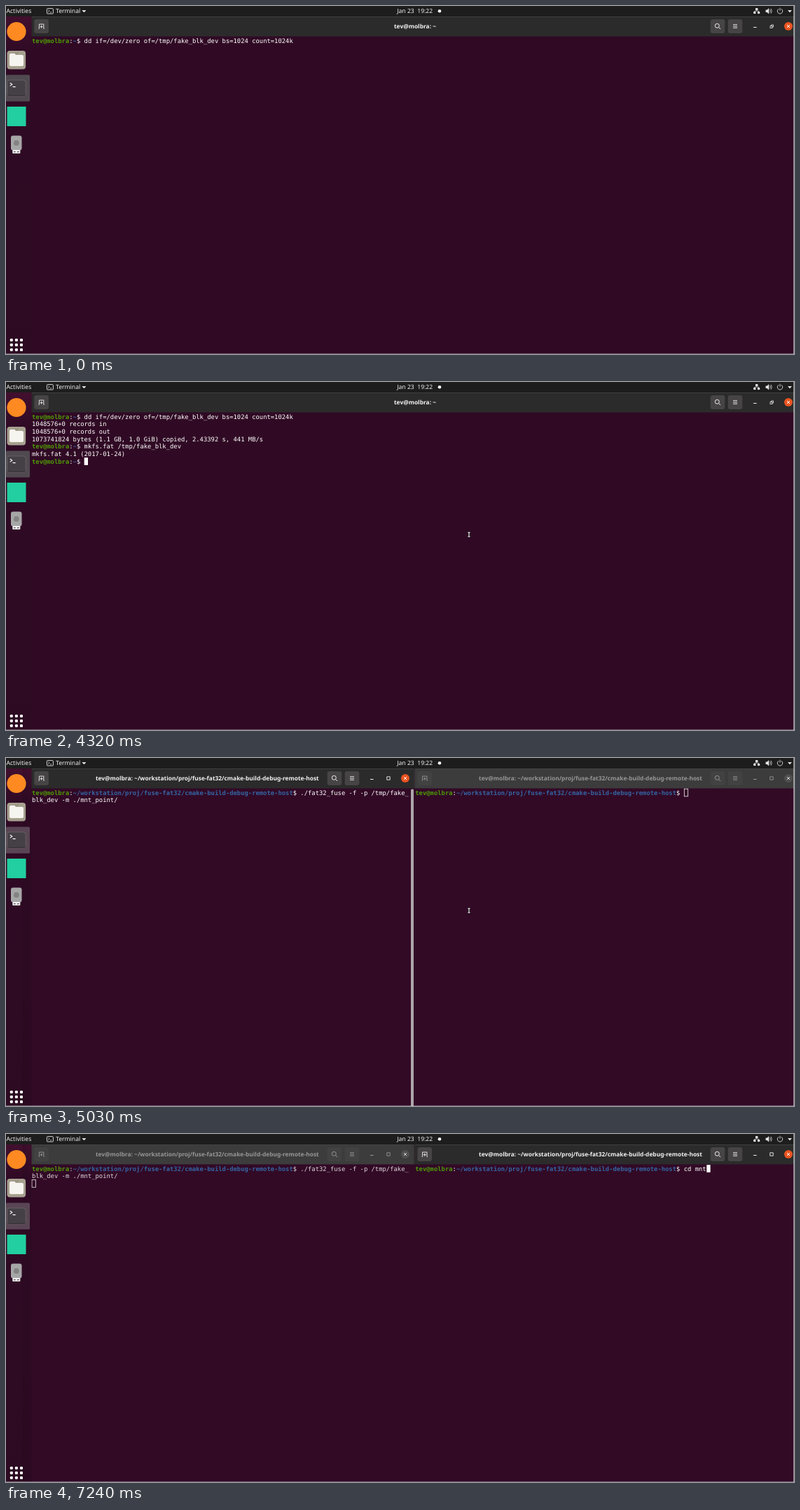
Recreate the animation shown at these times as an HTML page. Size 1125 by 498 pixels, loop 8000 ms.

```html
<!DOCTYPE html>
<html lang="en">
<head>
<meta charset="utf-8">
<title>Terminal session</title>
<style>
  html, body { margin: 0; width: 100%; height: 100%; overflow: hidden; background: #300a24; }
  svg { display: block; width: 100%; height: 100%; }
  text { white-space: pre; text-rendering: geometricPrecision; }
  .ui { font: 8.6px "Noto Sans", "Open Sans", sans-serif; fill: #f2f2f2; }
  .title { font-size: 8.4px; font-weight: 700; text-anchor: middle; }
  .mono { font: 8.858px "DejaVu Sans Mono", monospace; }
  .user { font-weight: 700; fill: #4e9a06; }
  .path { font-weight: 700; fill: #3465a4; }
</style>
</head>
<body>
<svg id="stage" viewBox="0 0 1125 498" preserveAspectRatio="none"></svg>
<script>
const LOOP = 8000, HEIGHT = 498;
const CELL = 16 / 3, LINE = 32 / 3, TOP = 44.2;
const USER = 'tev@molbra';
const DIR = '~/workstation/proj/fuse-fat32/cmake-build-debug-remote-host';
const ACCENT = '#e95420';
const LEFT = 37, RIGHT = 584.3;

const MKFS = 'mkfs.fat /tmp/fake_blk_dev ';
const MKFS_KEYS = [[1110, 2], [1230, 4], [1510, 6], [1660, 7], [1810, 9], [2240, 10], [2390, 11],
  [2510, 12], [2660, 14], [2940, 16], [3060, 17], [3210, 27]];
const CD = 'cd mnt';
const CD_KEYS = [[6670, 1], [6820, 2], [6940, 3], [7090, 4], [7240, 6]];

const typed = (text, keys, t) =>
  text.slice(0, keys.reduce((count, [at, n]) => t >= at ? n : count, 0));

const rect = (x, y, w, h, fill, rx = 0, extra = '') =>
  `<rect x="${x}" y="${y}" width="${w}" height="${h}" fill="${fill}" rx="${rx}" ${extra}/>`;
const circle = (x, y, r, fill) => `<circle cx="${x}" cy="${y}" r="${r}" fill="${fill}"/>`;
const stroke = (d, color, width = 1) =>
  `<path d="${d}" fill="none" stroke="${color}" stroke-width="${width}"/>`;
const fill = (d, color) => `<path d="${d}" fill="${color}"/>`;
const label = (x, y, text, cls = '', color = '#f2f2f2') =>
  `<text class="ui ${cls}" x="${x}" y="${y}" style="fill:${color}">${text}</text>`;
const at = (x, y, body) => `<g transform="translate(${x} ${y})">${body}</g>`;

function mix(from, to, k) {
  const channel = i => Math.round(from[i] + (to[i] - from[i]) * k);
  return `rgb(${channel(0)},${channel(1)},${channel(2)})`;
}

const termLine = (x, row, body, color = '#fff') =>
  `<text class="mono" x="${x}" y="${TOP + row * LINE + 8.4}" fill="${color}">${body}</text>`;
const prompt = (dir, command) =>
  `<tspan class="user">${USER}</tspan>:<tspan class="path">${dir}</tspan>$ ${command}`;

function cursor(x, row, col, style) {
  const cx = x + col * CELL, cy = TOP + row * LINE;
  if (style === 'solid') return rect(cx, cy, CELL, LINE, '#fff');
  if (style === 'hollow') return rect(cx, cy, CELL, LINE, 'none', 0, 'stroke="#eee" stroke-width=".8"');
  return '';
}

// focus runs from 0 (backdrop) to 1 (active)
function titleBar(x, right, center, title, focus, maximized) {
  const ink = mix([150, 150, 150], [242, 242, 242], focus);
  const button = mix([66, 66, 66], [70, 68, 69], focus);
  const box = cx => rect(cx - 10.3, 19, 20.6, 20, button, 3);
  const size = maximized
    ? stroke('M-2 -.5h3v3h-3zM-.5 -.5v-1.5h3v3h-1.5', ink, .8)
    : stroke('M-2.2 -2.2h4.4v4.4h-4.4z', ink, .9);
  const close = mix([80, 79, 79], [233, 84, 32], focus);
  return rect(x, 15, right - x, 28.4, mix([60, 60, 60], [43, 43, 43], focus)) +
    rect(x, 15, right - x, .7, '#484848') +
    box(x + 14.3) + box(right - 113) + box(right - 88) +
    at(x + 14.3, 29, stroke('M-4.2 3.3h1V-3h6.4v6.3h1M0 -1.3v4M-2 .7h4', ink, .9)) +
    label(center, 32, title, 'title', ink) +
    at(right - 113, 29, stroke('M2.3 -.7a3 3 0 1 1-6 0a3 3 0 1 1 6 0M1.5 1.4l2.6 2.6', ink)) +
    at(right - 88, 29, stroke('M-3 -2.3h6M-3 0h6M-3 2.3h6', ink, .9)) +
    at(right - 59.7, 30.5, stroke('M-2.3 0h4.6', ink)) +
    at(right - 36, 29, size) +
    circle(right - 12, 29, 6, close) +
    at(right - 12, 29, stroke('M-2 -2l4 4M2 -2l-4 4', mix([215, 215, 215], [255, 255, 255], focus), 1));
}

function singleWindow(t) {
  const rows = [prompt('~', 'dd if=/dev/zero of=/tmp/fake_blk_dev bs=1024 count=1024k')];
  let caret = t >= 400 ? cursor(LEFT, 1, 0, 'solid') : '';
  if (t >= 550) {
    const command = typed(MKFS, MKFS_KEYS, t);
    rows.push('1048576+0 records in', '1048576+0 records out',
      '1073741824 bytes (1.1 GB, 1.0 GiB) copied, 2.43392 s, 441 MB/s', prompt('~', command));
    caret = cursor(LEFT, 4, 14 + command.length, 'solid');
  }
  if (t >= 3610) {
    rows.push('mkfs.fat 4.1 (2017-01-24)', prompt('~', ''));
    caret = cursor(LEFT, 6, 14, t >= 4170 && t < 4320 ? '' : 'solid');
  }
  return rect(36.3, 15, 1089, HEIGHT, '#300a24') +
    titleBar(36.3, 1129, 584, USER + ': ~', 1, true) +
    rows.map((row, i) => termLine(LEFT, i, row)).join('') + caret;
}

function splitWindows(t) {
  const focus = t < 6010 ? 0 : Math.min(3, Math.floor((t - 6010) / 120) + 1) / 3;
  const title = `${USER}: ${DIR}`;
  const leftInk = mix([255, 255, 255], [224, 216, 220], focus);
  const command = typed(CD, CD_KEYS, t);
  let leftCaret = '';
  if (t < 5030) leftCaret = cursor(LEFT, 1, 23, 'solid');
  else if (t >= 5430) leftCaret = cursor(LEFT, 2, 0, t < 5860 ? 'solid' : 'hollow');
  const rightStyle = t < 6010 ? 'hollow' : t >= 6520 && t < 6670 ? '' : 'solid';
  return rect(24, 15, 1101, HEIGHT, '#320a26') +
    titleBar(36.3, 582, 287.3, title, 1 - focus, false) +
    titleBar(583.5, 1129, 834.5, title, focus, false) +
    rect(582, 15, 1.5, 28.4, '#333') +
    rect(578, 44.5, 4, HEIGHT, '#aea5aa', 1.5, `opacity="${1 - focus}"`) +
    termLine(LEFT, 0, prompt(DIR, './fat32_fuse -f -p /tmp/fake_'), leftInk) +
    termLine(LEFT, 1, 'blk_dev -m ./mnt_point/', leftInk) + leftCaret +
    termLine(RIGHT, 0, prompt(DIR, command)) +
    cursor(RIGHT, 0, 72 + command.length, rightStyle);
}

function topBar() {
  const ink = '#e6e6e6';
  return rect(0, 0, 1125, 15, '#1d1d1d') +
    label(.5, 10.4, 'Activities') +
    rect(58.4, 3.6, 9, 7.4, 'none', 1, `stroke="${ink}" stroke-width=".9"`) +
    stroke('M60.3 5.6l1.6 1.5l-1.6 1.5M63 9h2', ink, .8) +
    label(71, 10.4, 'Terminal') +
    fill('M108.4 6h6l-3 3.2z', ink) +
    `<text class="ui" x="583.7" y="10.4" text-anchor="middle">Jan 23  19:22</text>` +
    circle(619, 7.3, 2.3, '#fff') +
    fill('M1070 3h3.4v3h-3.4zM1067.2 8h3.2v3h-3.2zM1073 8h3.2v3h-3.2z', ink) +
    stroke('M1071.7 6v1.2M1068.8 8v-.9h5.8v.9', ink, .7) +
    fill('M1084.6 5.4h2l2.6-2.4v8.4l-2.6-2.4h-2z', ink) +
    stroke('M1090.5 5.2q1.6 2 0 4M1092 3.7q2.8 3.5 0 7', ink, .8) +
    stroke('M1103 4.2a3.7 3.7 0 1 0 4 0M1105 2.7v4', ink, .9) +
    fill('M1116 6h6l-3 3.2z', ink);
}

function dock(split) {
  let dots = '';
  for (let i = 0; i < 9; i++)
    dots += rect(5.8 + i % 3 * 7.1, 476 + Math.floor(i / 3) * 7, 4, 4, '#fff', 1.2);
  return `<defs>
      <linearGradient id="dock" x2="0" y2="1">
        <stop stop-color="#42102f"/><stop offset=".1" stop-color="#300a25"/><stop offset="1" stop-color="#2d0a22"/>
      </linearGradient>
      <linearGradient id="shade"><stop stop-color="#1c0615" stop-opacity=".2"/>
        <stop offset="1" stop-color="#1c0615" stop-opacity=".05"/></linearGradient>
    </defs>` +
    rect(0, 15, 36.3, 483, 'url(#dock)') +
    (split ? rect(23.5, 15, 12.8, 483, 'url(#shade)') : '') +
    circle(15, 36.5, 13.6, '#ff8a22') +
    rect(1.5, 64, 26.6, 26.6, '#a6a08f', 4) +
    fill('M5 70q0-2 2-2h5l2 2h9q2 0 2 2v12q0 2-2 2h-16q-2 0-2-2z', '#f6f4ee') +
    stroke('M13 66.5l2 2l3-2.5', '#827c6e', .8) +
    rect(0, 98.5, 34, 38, split ? '#594553' : '#504a50', 1.5) +
    rect(1.6, 106, 26.6, 23, '#454046', 3.5, 'stroke="#6f696f" stroke-width=".8"') +
    stroke('M2.5 126.5q0 1.8 2 1.8h21q2 0 2-1.8', '#2c282c', .9) +
    stroke('M5.8 110l3 2.2l-3 2.2M9.6 115.6h4', '#fff', 1.1) +
    rect(1.5, 144, 27, 28, '#21cfa0') +
    rect(7, 185.5, 15.5, 21, '#a7a6a7', 3) +
    circle(14.8, 196, 4, '#858485') +
    rect(9.3, 206, 11, 5, '#f0f0f0', .8) +
    rect(11, 208, 2.6, 1.4, '#555') + rect(16, 208, 2.6, 1.4, '#555') +
    dots;
}

function switcher() {
  const slot = (y, color, border) => rect(505.4, y, 156.4, 69.6, color, 3, `stroke="${border}" stroke-width=".8"`);
  return rect(498, 140.6, 171.2, 239, '#1d1d1d', 6, 'stroke="#454145" stroke-width=".9"') +
    slot(148.2, ACCENT, ACCENT) + slot(225.4, '#1d1d1d', '#3c3a3c') + slot(302.6, '#1d1d1d', '#3c3a3c');
}

const pointer = () => {
  const beam = 'M659.4 215.2h3.2M661 215.2v6M659.4 221.2h3.2';
  return stroke(beam, '#111', 2.2) + stroke(beam, '#fff', 1.1);
};

function scene(t) {
  const split = t >= 4440;
  let desktop = split ? splitWindows(t) : singleWindow(t);
  if (split && t < 4590) {
    const remaining = .25;
    desktop = at(0, -HEIGHT * remaining, desktop) + at(0, HEIGHT * (1 - remaining), singleWindow(t));
  }
  return rect(0, 0, 1125, HEIGHT, '#300a24') + desktop + dock(split) + topBar() +
    (split && t < 5030 ? switcher() : '') +
    (t >= 4320 && t < 6670 ? pointer() : '') +
    rect(1124, 0, 1, HEIGHT, '#fff', 0, 'opacity=".5"') +
    rect(0, 497, 1125, 1, '#fff', 0, 'opacity=".3"');
}

const stage = document.getElementById('stage');
const start = performance.now();
let shown = '';
function frame() {
  const markup = scene((performance.now() - start) % LOOP);
  if (markup !== shown) stage.innerHTML = shown = markup;
  requestAnimationFrame(frame);
}
frame();
</script>
</body>
</html>
```
